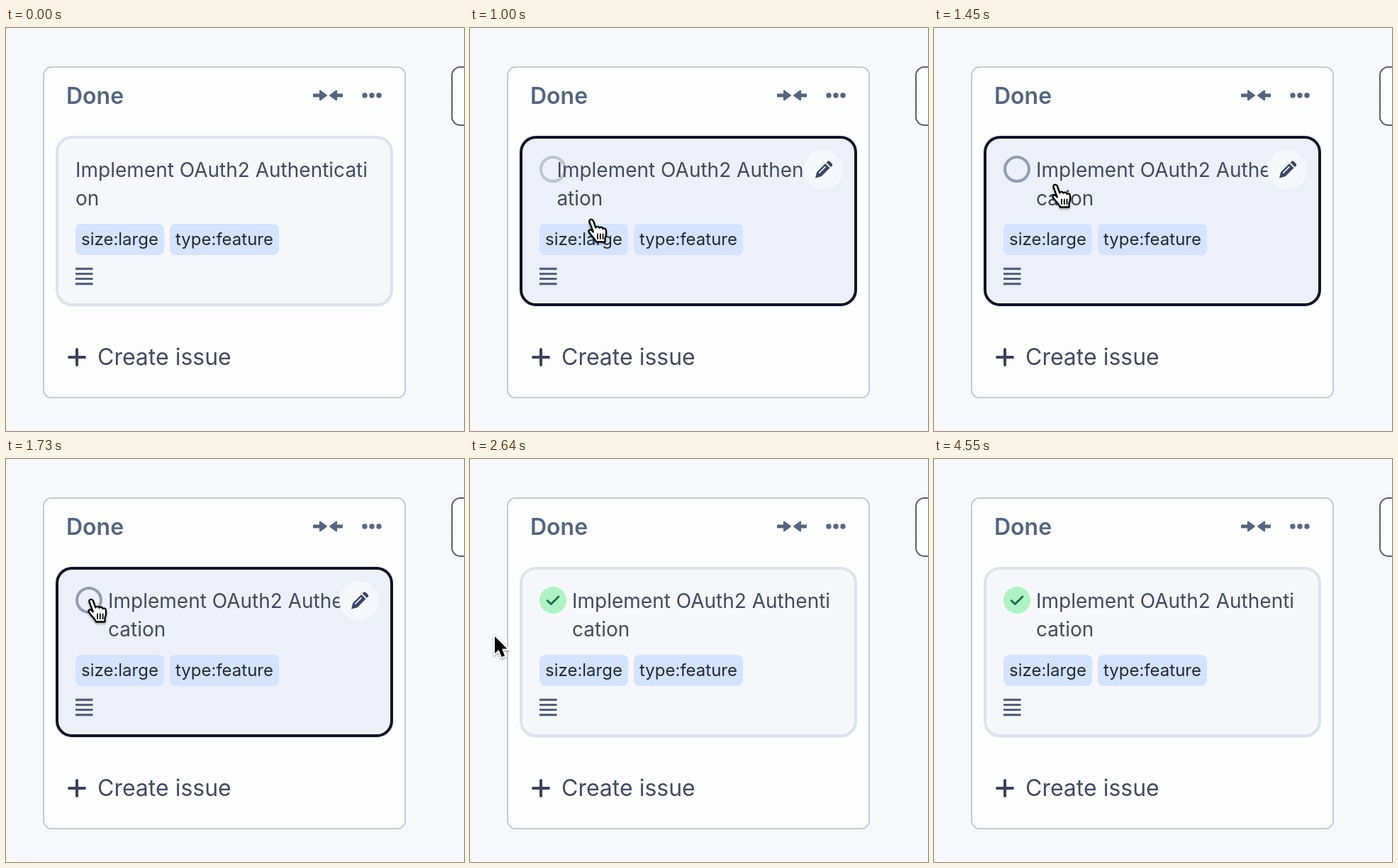
Write an HTML page that moves like this. It is 646 px wide and 568 px high and loops after 4.73 s.

```html
<!DOCTYPE html>
<html lang="en">
<head>
<meta charset="utf-8">
<title>Board column</title>
<style>
  html, body { margin: 0; width: 100%; height: 100%; overflow: hidden; background: #f7f8fc; }
  svg { display: block; width: 646px; height: 568px; font-family: Inter, sans-serif; }
  .slate { fill: #56657f; }
  .title { font-size: 28px; fill: #434a60; }
  .tag { font-size: 24px; fill: #22283a; }
  #card { fill: #f6f7fb; stroke: #dee2ec; stroke-width: 4; }
  .hover #card { fill: #edf0f9; stroke: #12122a; }
  #edit, #hand { visibility: hidden; }
  .hover #edit, .hover #hand { visibility: visible; }
  .hover #arrow { visibility: hidden; }
  #cursor { filter: drop-shadow(0 2px 1.5px rgba(0, 0, 0, .3)); }
</style>
</head>
<body>
<svg id="stage" viewBox="0 0 646 568">
  <rect x="53" y="55" width="510" height="466" rx="11" fill="#fdfdfe" stroke="#c7cad3" stroke-width="2"/>
  <rect x="629" y="55" width="60" height="82" rx="12" fill="#fdfdfe" stroke="#566080" stroke-width="2"/>

  <!-- Column header -->
  <text x="85" y="107" font-size="32" font-weight="600" class="slate">Done</text>
  <g class="slate" stroke="#56657f" stroke-width="2" stroke-linejoin="round">
    <path d="M434 93.5H443V88.5L452 95L443 101.5V96.5H434Z"/>
    <path d="M474 93.5H466V88.5L457 95L466 101.5V96.5H474Z"/>
  </g>
  <g class="slate">
    <circle cx="506" cy="95" r="3.7"/>
    <circle cx="516" cy="95" r="3.7"/>
    <circle cx="526" cy="95" r="3.7"/>
  </g>

  <!-- Card -->
  <rect x="70" y="154" width="476" height="239" rx="23" fill="#e9ebf1"/>
  <rect id="card" x="72" y="154" width="472" height="236" rx="21"/>
  <circle id="ring" cx="117" cy="199" r="17" fill="none" stroke="#919db0" stroke-width="4"/>
  <g id="done">
    <circle cx="117" cy="199" r="19" fill="#aef3c6"/>
    <path d="M109 199.5L114.3 204.5L125 194" fill="none" stroke="#1e6b4a" stroke-width="2.8" stroke-linecap="round" stroke-linejoin="round"/>
  </g>
  <g id="title" class="title">
    <text x="98" y="210" id="line1"></text>
    <text x="98" y="250" id="line2"></text>
  </g>
  <rect x="98" y="276" width="125" height="44" rx="8" fill="#d4e3fe"/>
  <text x="106" y="306" class="tag">size:large</text>
  <rect x="231" y="276" width="154" height="44" rx="8" fill="#d4e3fe"/>
  <text x="239" y="306" class="tag">type:feature</text>
  <path d="M98 339.3H122.5M98 346.5H122.5M98 353.5H122.5M98 360.7H122.5" stroke="#56607f" stroke-width="3.2"/>
  <g id="edit">
    <circle cx="498" cy="200" r="28" fill="#f6f7fb"/>
    <g transform="translate(498 200.5) rotate(45)" fill="#3b4566">
      <path d="M-4.5 -9H4.5V8L0 15.5L-4.5 8Z"/>
      <path d="M-4.5 -11V-13Q-4.5 -15.5 -2 -15.5H2Q4.5 -15.5 4.5 -13V-11Z"/>
      <path d="M-1.2 -6V7" stroke="#f6f7fb" stroke-width="1.6"/>
    </g>
  </g>

  <!-- Footer -->
  <path d="M89 464H111M100 453V475" stroke="#3d4059" stroke-width="4" stroke-linecap="round"/>
  <text x="129" y="475" font-size="32" fill="#434a60">Create issue</text>

  <g id="cursor">
    <path id="arrow" d="M2 3V27L7.5 22L11.7 32L16 30.2L12 20.6H19.5Z" stroke="#fff" stroke-width="3.6" paint-order="stroke"/>
    <g id="hand" stroke-linejoin="round" stroke-linecap="round">
      <path d="M2.5 5.5C1.5 1.5 6.5 .5 8 4L11.3 13.5C12.5 11.2 15.8 11.4 16.5 13.8C18 11.8 20.8 12.4 21.5 15C23 13.6 25.5 14.5 25.8 17C26.5 21 26 25 24.5 28V33.5H12C11 30 6.5 26.5 4.2 23L1.6 19.5C.4 17 3.6 15.2 5.6 17.2L7.8 19.4Z" fill="#fff" stroke="#000" stroke-width="2.3"/>
      <path d="M14 22.5V29M17.8 22.5V29M21.6 22.5V29" stroke="#000" stroke-width="1.8"/>
    </g>
  </g>
</svg>
<script>
const LOOP = 4730, FPS = 11, INDENT = 46;
const HOVER_IN = 10, CHECKED = 21, HOVER_OUT = 28;
const TITLE = 'Implement OAuth2 Authentication';
const $ = id => document.getElementById(id);

// Pointer stops: [step, x, y]; each holds until the next one.
const pointer = [
  [8, -12, 432], [9, 38, 380], [10, 109, 316], [11, 166, 268],
  [12, 172, 240], [13, 170, 228], [14, 168, 222], [15, 166, 219],
  [17, 150, 208], [18, 125, 198], [19, 115, 196],
  [27, 100, 205], [28, 68, 227], [29, 33, 247], [30, 2, 262], [31, -60, 280]
];

// How many characters fit on the first line for a given indent.
const lineLength = indent => indent < 6 ? 29 : indent < 13 ? 28 : indent < 28 ? 26 : 25;

function draw(step) {
  const stop = pointer.filter(p => p[0] <= step).pop() || [0, -60, 0];
  const reveal = Math.min(1, Math.max(0, (step - HOVER_IN) * 0.53));
  const indent = INDENT * reveal;
  const cut = lineLength(indent);
  const checked = step >= CHECKED;

  $('stage').classList.toggle('hover', step >= HOVER_IN && step < HOVER_OUT);
  $('cursor').setAttribute('transform', `translate(${stop[1]} ${stop[2]})`);
  $('title').setAttribute('transform', `translate(${indent} 0)`);
  $('line1').textContent = TITLE.slice(0, cut);
  $('line2').textContent = TITLE.slice(cut);
  $('ring').style.opacity = checked ? 0 : reveal;
  $('done').style.opacity = checked ? 1 : 0;
}

let shown = -1;
function tick() {
  const time = performance.now() % LOOP;
  const step = Math.floor((time + 5) * FPS / 1000);
  if (step !== shown) draw(shown = step);
  requestAnimationFrame(tick);
}
tick();
</script>
</body>
</html>
```
